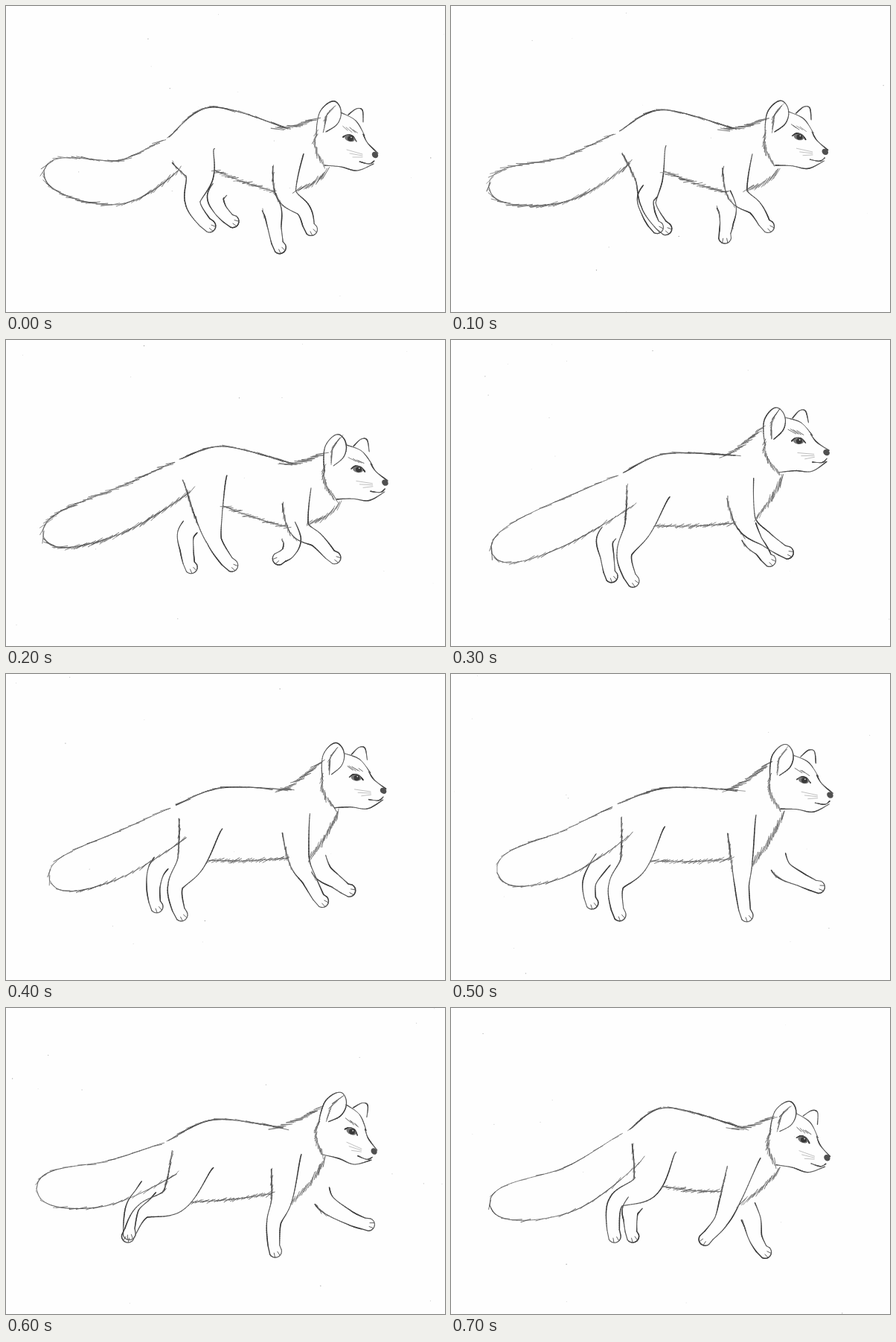
These frames come from a looping animation (590x411 px, 0.8 s). An HTML page with a canvas:

```html
<!DOCTYPE html>
<html lang="en">
<head>
<meta charset="utf-8">
<title>Running fox</title>
<style>
html, body { margin: 0; width: 100%; height: 100%; overflow: hidden; background: #fefefe; }
canvas { display: block; width: 590px; height: 411px; }
</style>
</head>
<body>
<canvas id="stage" width="590" height="411"></canvas>
<script>
const ctx = document.getElementById('stage').getContext('2d');
const STEP = 100, COUNT = 8, SAMPLES = 42;

// Key poses of the run. head: eye x, y, tilt; back: rump, peak, dip;
// tail: middle, tip; legs: knee, hock, ankle. The rest follows from these.
const poses = [
  { step: 0, fur: [0.8], head: [462, 178, 0], back: [219, 176, 275, 136, 375, 163], tail: [150, 237, 51, 221],
    hindNear: [260, 228, 251, 264, 269, 293], hindFar: [282, 255, 287, 272, 300, 287],
    foreNear: [376, 250, 400, 274, 407, 296], foreFar: [358, 275, 361, 298, 365, 320] },
  { step: 2, fur: [1], head: [473, 174, -7], back: [234, 160, 292, 143, 385, 166], tail: [150, 230, 50, 264],
    hindNear: [272, 232, 280, 270, 299, 300], hindFar: [242, 260, 243, 282, 246, 301],
    foreNear: [393, 250, 418, 269, 437, 290], foreFar: [384, 268, 380, 284, 371, 291] },
  { step: 3, fur: [0.5], head: [467, 136, -11], back: [232, 178, 288, 153, 382, 155], tail: [150, 245, 55, 287],
    hindNear: [252, 250, 233, 287, 241, 320], hindFar: [207, 268, 210, 292, 213, 313],
    foreNear: [396, 244, 424, 268, 447, 284], foreFar: [405, 268, 417, 282, 424, 293] },
  { step: 5, fur: [0.5], head: [474, 143, -4], back: [225, 174, 290, 153, 385, 156], tail: [148, 243, 62, 267],
    hindNear: [246, 252, 222, 284, 224, 319], hindFar: [198, 258, 186, 280, 187, 303],
    foreNear: [391, 252, 391, 285, 395, 320], foreFar: [445, 262, 470, 276, 489, 285] },
  { step: 6, fur: [0.4], head: [464, 166, 8], back: [218, 178, 280, 150, 372, 161], tail: [133, 236, 41, 243],
    hindNear: [227, 256, 184, 273, 166, 302], hindFar: [185, 249, 170, 268, 165, 298],
    foreNear: [371, 255, 360, 288, 360, 322], foreFar: [430, 262, 462, 282, 482, 290] },
  { step: 7, fur: [0.35], head: [473, 177, 4], back: [240, 163, 290, 134, 392, 161], tail: [157, 244, 52, 265],
    hindNear: [262, 238, 222, 260, 218, 302], hindFar: [242, 270, 241, 285, 242, 302],
    foreNear: [376, 255, 363, 286, 345, 307], foreFar: [404, 285, 409, 308, 418, 325] }
];

// Leg widths at hip, knee, hock and ankle, and where the visible edges begin.
const legs = {
  hindFar: { widths: [26, 23, 18, 15], rear: 0.2, front: 0.2 },
  foreFar: { widths: [28, 25, 18, 15], rear: 0.25, front: 0.1 },
  hindNear: { widths: [60, 38, 20, 16], rear: 0, front: 0 },
  foreNear: { widths: [42, 28, 19, 15], rear: 0.15, front: 0 }
};

// Head lines around the eye: weight, then points.
const headLines = [
  [1, [-45, -4], [-44, -20], [-40, -36], [-30, -47], [-20, -50], [-13, -42], [-12, -30], [-18, -18], [-32, -9]],
  [0.9, [-2, -32], [9, -40], [17, -38], [18, -22]],
  [0.7, [-12, -35], [8, -24], [20, -4]],
  [0.95, [18, -6], [24, 6], [38, 20]],
  [0.95, [-34, 36], [-12, 38], [10, 43], [32, 34]],
  [0.9, [13, 31], [26, 34], [33, 30]],
  [1.2, [-9, -2], [-3, -5], [4, -3], [9, 4]]
];

const lerp = (a, b, k) => a + (b - a) * k;
const pairs = list => Array.from({ length: list.length / 2 }, (_, i) => list.slice(i * 2, i * 2 + 2));
const shift = ([x, y], dx, dy) => [x + dx, y + dy];
const along = (pts, u) => pts[Math.round(u * SAMPLES)];

function seeded(seed) {
  let s = seed * 7919 + 17;
  return () => (s = (s * 16807) % 2147483647) / 2147483647;
}

// Catmull-Rom curve, sampled evenly over its points.
function curve(pts) {
  const last = pts.length - 1;
  const at = i => pts[Math.max(0, Math.min(last, i))];
  return Array.from({ length: SAMPLES + 1 }, (_, n) => {
    const u = n / SAMPLES * last, i = Math.min(last - 1, Math.floor(u)), t = u - i;
    return [0, 1].map(c => {
      const [a, b, d, e] = [at(i - 1)[c], at(i)[c], at(i + 1)[c], at(i + 2)[c]];
      return b + 0.5 * t * (d - a + t * (2 * a - 5 * b + 4 * d - e + t * (3 * (b - d) + e - a)));
    });
  });
}

// The two edges of a band of changing width around a curve.
function band(pts, width) {
  const mid = curve(pts);
  const edge = side => mid.map(([x, y], i) => {
    const a = mid[Math.max(0, i - 1)], b = mid[Math.min(SAMPLES, i + 1)];
    const dx = b[0] - a[0], dy = b[1] - a[1];
    const k = side * width(i / SAMPLES) / 2 / Math.hypot(dx, dy);
    return [x - dy * k, y + dx * k];
  });
  return { mid, rear: edge(1), front: edge(-1) };
}

function poseAt(step) {
  const i = poses.findLastIndex(p => p.step <= step);
  const a = poses[i], b = poses[(i + 1) % poses.length];
  const k = a.step === step ? 0 : (step - a.step) / (b.step - a.step);
  const out = {};
  for (const key in a) if (key !== 'step') out[key] = a[key].map((v, n) => lerp(v, b[key][n], k));
  return out;
}

function line([x1, y1], [x2, y2], width, grey) {
  ctx.lineWidth = width;
  ctx.strokeStyle = `rgb(${grey},${grey},${grey})`;
  ctx.beginPath();
  ctx.moveTo(x1, y1);
  ctx.lineTo(x2, y2);
  ctx.stroke();
}

function pencil(pts, weight, rnd) {
  const phase = rnd() * 6;
  for (let i = 1; i < pts.length; i++) {
    const press = weight * (0.95 + 0.25 * Math.sin(i * 0.24 + phase));
    line(pts[i - 1], pts[i], 0.4 + press * 0.9, Math.round(Math.max(55, 150 - press * 75)));
  }
}

function hair(pts, length, tilt, gap, rnd) {
  let rest = gap / 2;
  for (let i = 1; i < pts.length; i++) {
    const [x, y] = pts[i], dx = x - pts[i - 1][0], dy = y - pts[i - 1][1];
    for (rest -= Math.hypot(dx, dy); rest <= 0; rest += gap * (0.6 + rnd() * 0.8)) {
      const a = Math.atan2(dy, dx) + tilt * (0.6 + rnd() * 0.8);
      const half = length * (0.35 + rnd() * 0.35), sway = rnd() * 2 - 1;
      const cx = Math.cos(a) * half, cy = Math.sin(a) * half;
      line([x - cx, y - cy + sway], [x + cx, y + cy + sway], 0.85, 75 + Math.round(rnd() * 65));
    }
  }
}

function blob(x, y, rx, ry, tilt, fill) {
  ctx.fillStyle = fill;
  ctx.beginPath();
  ctx.ellipse(x, y, rx, ry, tilt, 0, Math.PI * 2);
  ctx.fill();
}

function drawTail(rump, bend, fur, rnd) {
  const width = u => 64 * (0.7 + 0.5 * u) * (1 - u ** 4) ** 0.6;
  const tail = band([shift(rump, 3, 24), ...bend], width);
  pencil(tail.rear, 0.65, rnd);
  pencil(tail.front, 0.7, rnd);
  hair(tail.rear, 8 + fur * 8, 0.2 * fur, 7 / fur, rnd);
  hair(tail.front.slice().reverse(), 8 + fur * 8, -0.22, 5 / fur, rnd);
}

function drawLeg(name, hip, joints, rnd) {
  const { widths, rear, front } = legs[name];
  const leg = band([hip, ...joints], u => {
    const i = Math.min(2, Math.floor(u * 3));
    return lerp(widths[i], widths[i + 1], u * 3 - i);
  });
  const end = leg.mid[SAMPLES], before = leg.mid[SAMPLES - 3];
  const aim = Math.atan2(end[1] - before[1], end[0] - before[0]);
  // A paw under the body turns forward; a trailing one keeps its line.
  const turn = Math.atan2(Math.sin(aim), Math.cos(aim) + 0.7 * Math.max(0, Math.cos(aim) + 0.5));
  const pad = shift(end, Math.cos(turn) * 5, Math.sin(turn) * 5);
  const rim = (a, r) => shift(pad, Math.cos(turn + a) * r, Math.sin(turn + a) * r);
  const cap = Array.from({ length: 11 }, (_, i) => rim(1.4 - i * 0.28, 8.5));
  const from = (edge, u) => edge.slice(Math.round(u * SAMPLES), -2);
  pencil([...from(leg.rear, rear), ...cap, ...from(leg.front, front).reverse()], 1.05, rnd);
  for (const a of [-0.45, 0.45]) line(rim(a, 8), rim(a * 2.2, 3), 0.9, 80);
  if (name !== 'hindFar') hair(leg.rear.slice(Math.round(rear * SAMPLES), 18), 11, 0.2, 7, rnd);
  return leg;
}

function drawHead([x, y, tilt], rnd) {
  ctx.save();
  ctx.translate(x, y);
  ctx.rotate(tilt * Math.PI / 180);
  for (const [weight, ...pts] of headLines) pencil(curve(pts), weight, rnd);
  hair(curve([[-45, -9], [-47, 4], [-44, 20], [-34, 36]]), 11, 0.3, 3.5, rnd);
  hair(curve([[-34, -14], [-31, -30], [-21, -43]]), 13, 0.1, 3, rnd);
  hair(curve([[-8, -15], [8, -9]]), 9, 0.3, 4, rnd);
  blob(0, 0, 7, 4, 0.3, '#777');
  blob(1, 0, 4, 3.6, 0, '#393939');
  blob(2, -1.5, 0.9, 0.8, 0, '#eee');
  blob(34, 22, 4.6, 3.8, 0.8, '#505050');
  for (let i = 0; i < 3; i++) line([-4 + i * 4, 15 + i * 5], [17, 21 + i * 2], 0.6, 155);
  ctx.restore();
}

function specks(rnd) {
  for (let i = 0; i < 14; i++) {
    const size = 0.3 + rnd() * 0.4, grey = 150 + Math.round(rnd() * 70);
    blob(rnd() * 590, rnd() * 411, size, size, 0, `rgb(${grey},${grey},${grey})`);
  }
}

function draw(step) {
  const pose = poseAt(step), rnd = seeded(step + 3);
  ctx.fillStyle = '#fefefe';
  ctx.fillRect(0, 0, 590, 411);
  ctx.lineCap = 'round';
  specks(rnd);

  const back = pairs(pose.back), [rump, , dip] = back, [fur] = pose.fur;
  const joints = {};
  for (const name in legs) joints[name] = pairs(pose[name]);
  const tops = {
    hindFar: shift(joints.hindFar[0], 14, -18), foreFar: shift(joints.foreFar[0], -10, -22),
    hindNear: shift(rump, 33, 25), foreNear: shift(dip, 4, 34)
  };
  const leg = {};
  drawTail(rump, pairs(pose.tail), fur, rnd);
  for (const name in legs) leg[name] = drawLeg(name, tops[name], joints[name], rnd);

  const spine = curve(back);
  pencil(spine, 1.1, rnd);
  hair(spine, 15, 0.08, 9, rnd);

  const [ex, ey, tilt] = pose.head, r = tilt * Math.PI / 180;
  const onHead = (x, y) => [ex + x * Math.cos(r) - y * Math.sin(r), ey + x * Math.sin(r) + y * Math.cos(r)];
  const sagged = (a, b, sag) => curve([a, [lerp(a[0], b[0], 0.5), lerp(a[1], b[1], 0.5) + sag], b]);

  hair(sagged(shift(dip, -15, 2), onHead(-45, -27), 3), 13, 0.25, 3, rnd);
  const belly = sagged(along(leg.hindNear.front, 0.28), along(leg.foreNear.rear, 0.3), 2);
  pencil(belly, 0.6, rnd);
  hair(belly, 10, -0.4, 4, rnd);
  hair(sagged(along(leg.foreNear.front, 0.36), onHead(-30, 44), 5), 13, -0.32, 3, rnd);
  drawHead(pose.head, rnd);
}

let shown = -1;
function tick() {
  const step = Math.floor(performance.now() / STEP) % COUNT;
  if (step !== shown) draw(shown = step);
  requestAnimationFrame(tick);
}
tick();
</script>
</body>
</html>
```
